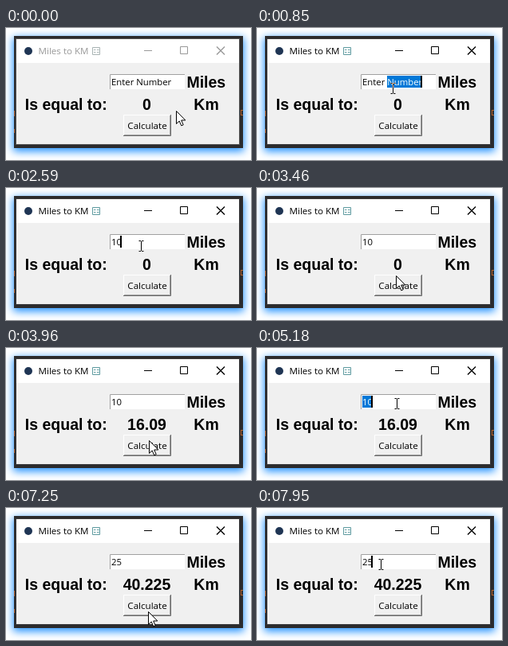
An HTML page that plays this animation: 307 px wide and 166 px high, repeating every 8 s.

```html
<!DOCTYPE html>
<html lang="en">
<head>
<meta charset="utf-8">
<title>Miles to KM</title>
<style>
  html, body { margin: 0; width: 100%; height: 100%; overflow: hidden; background: #fff; }
  .back {
    position: absolute; left: 10px; top: 10px; width: 287px; height: 141px;
    background: #2b2b2d; box-shadow: 0 3px 10px 1px #1e90ff;
  }
  svg { position: absolute; left: 0; top: 0; width: 307px; height: 166px; }
  text { white-space: pre; }
  .ui { font: 11.6px "Open Sans", "Noto Sans", sans-serif; }
  .field { font: 11.35px "Open Sans", "Noto Sans", sans-serif; }
  .big { font: bold 19.5px "Liberation Sans", Arial, sans-serif; }
  .mid { text-anchor: middle; }
  .bar { --ink: #999; --icon: #a9b4b4; --edge: #555; }
  .bar.on { --ink: #000; --icon: #5f9ba0; --edge: #3a3a3c; }
  .bar text { fill: var(--ink); }
  .line { fill: none; stroke: var(--ink); }
  .cross { stroke-width: 1.4; }
  .glyph { fill: none; stroke: var(--icon); }
  .edge { fill: none; stroke: var(--edge); }
  #beam { mix-blend-mode: difference; fill: none; stroke: #fff; }
</style>
</head>
<body>
<div class="back"></div>
<svg viewBox="0 0 307 166">
  <defs><clipPath id="clip"><rect id="clipBox" y="60" height="15"/></clipPath></defs>

  <!-- editor behind the window -->
  <path d="M10.5 104v7M10.5 127v5M294 103.5h3M294 109.5h3M294.5 103v7" stroke="#b5622d" fill="none"/>

  <rect x="12" y="13" width="281" height="134" fill="#f0f0f0"/>
  <g id="bar" class="bar">
    <rect x="12" y="13" width="281" height="31" fill="#fff"/>
    <rect class="edge" x="12.5" y="13.5" width="280" height="133"/>
    <circle cx="28" cy="29" r="5" fill="#1f3554"/>
    <text class="ui" x="40.5" y="33">Miles to KM</text>
    <path class="glyph" d="M108.5 24.5h9v9h-9zM110 27.5h2.5M114 27.5h2.5M110 30.5h2.5M114 30.5h2.5"/>
    <path class="line" d="M173 28.5h10M218.5 23.5h9v9h-9z"/>
    <path class="line cross" d="M264 23.5l10 10M274 23.5l-10 10"/>
  </g>

  <text class="big" x="226.4" y="75">Miles</text>
  <text class="big" x="23.8" y="103">Is equal to:</text>
  <text class="big mid" x="176.5" y="103" id="km">0</text>
  <text class="big" x="235.3" y="103">Km</text>

  <!-- entry -->
  <rect x="130" y="58" width="94" height="19" fill="#fff"/>
  <path d="M130.5 77V58.5H224" fill="none" stroke="#a0a0a0"/>
  <text class="field" x="132" y="72" id="entry"></text>
  <rect id="mark" y="60" height="15" fill="#0078d7"/>
  <text class="field" x="132" y="72" id="picked" fill="#fff" clip-path="url(#clip)"></text>
  <rect id="caret" y="60" width="2" height="15"/>

  <!-- button -->
  <path d="M147.5 135V109.5H207" fill="none" stroke="#fff"/>
  <path d="M148 134.5H205.5V110" fill="none" stroke="#a0a0a0"/>
  <path d="M147 135.5H206.5V109" fill="none" stroke="#696969"/>
  <text class="ui mid" x="177" y="127">Calculate</text>

  <path id="arrow" d="M-.5 .5V16.5L3.2 13L5.7 18.8L8.2 17.8L5.7 12H10.8Z" fill="#fff" stroke="#000"/>
  <path id="beam" d="M-3 -6.5H-.5M.5 -6.5H3M-3 6.5H-.5M.5 6.5H3M0 -6V6"/>
</svg>
<script>
const LOOP = 8000, LEFT = 132;
const $ = id => document.getElementById(id);

// [time, pointer x, pointer y, changed state]; sel is the first selected character
const steps = [
  [0, 214, 104, { arrow: true, text: "Enter Number", sel: -1, caret: false, km: "0", on: false }],
  [170, 208, 98],
  [340, 190, 84],
  [510, 173.5, 75, { arrow: false }],
  [680, 170.5, 76, { on: true, caret: true }],
  [850, 170.5, 76, { sel: 6 }],
  [1030, 170.5, 75],
  [1200, 170.5, 74, { sel: 0 }],
  [1380, 170.5, 73, { caret: false }],
  [1550, 169.5, 73, { caret: true }],
  [2070, 169.5, 73, { text: "1", sel: -1 }],
  [2240, 169.5, 73, { text: "10", caret: false }],
  [2590, 169.5, 73, { caret: true }],
  [3110, 171, 82, { arrow: true, caret: false }],
  [3280, 173, 98],
  [3460, 175, 110],
  [3790, 179, 115, { km: "16.09" }],
  [3960, 180, 116],
  [4140, 180, 95],
  [4310, 180.5, 74, { arrow: false, caret: true }],
  [4660, 180.5, 65, { sel: 0 }],
  [5010, 177.5, 70, { caret: false }],
  [5180, 175.5, 70, { caret: true }],
  [5860, 175.5, 70, { text: "2", sel: -1 }],
  [6030, 175.5, 70, { text: "25" }],
  [6210, 175.5, 70, { caret: false }],
  [6560, 173.5, 70, { caret: true }],
  [6730, 174, 88, { arrow: true }],
  [6910, 177, 112],
  [7080, 178, 122, { km: "40.225", caret: false }],
  [7250, 179, 130],
  [7430, 172, 100],
  [7600, 160.5, 75, { arrow: false, caret: true }],
  [7770, 157.5, 66, { caret: false }],
  [7950, 155.5, 71, { caret: true }]
];

let state = {};
const scenes = steps.map(([t, x, y, change]) => {
  state = { ...state, ...change };
  return { ...state, t, x, y };
});

const set = (el, attrs) => {
  for (const k in attrs) el.setAttribute(k, attrs[k]);
};
const show = (el, on) => set(el, { visibility: on ? "visible" : "hidden" });

function draw(s) {
  $("bar").classList.toggle("on", s.on);
  $("km").textContent = s.km;
  $("entry").textContent = $("picked").textContent = s.text;

  const end = Math.round(LEFT + $("entry").getComputedTextLength());
  const skip = s.sel > 0 ? $("entry").getSubStringLength(0, s.sel) : 0;
  const from = Math.round(LEFT + skip);
  const box = { x: from, width: s.sel < 0 ? 0 : end - from };
  set($("mark"), box);
  set($("clipBox"), box);
  set($("caret"), { x: end - 2 });
  show($("caret"), s.caret);

  const place = { transform: `translate(${s.x} ${s.y})` };
  set($("arrow"), place);
  set($("beam"), place);
  show($("arrow"), s.arrow);
  show($("beam"), !s.arrow);
}

let shown;
function tick() {
  const t = performance.now() % LOOP;
  const scene = scenes.findLast(s => s.t <= t);
  if (scene !== shown) draw(shown = scene);
  requestAnimationFrame(tick);
}
tick();
</script>
</body>
</html>
```
